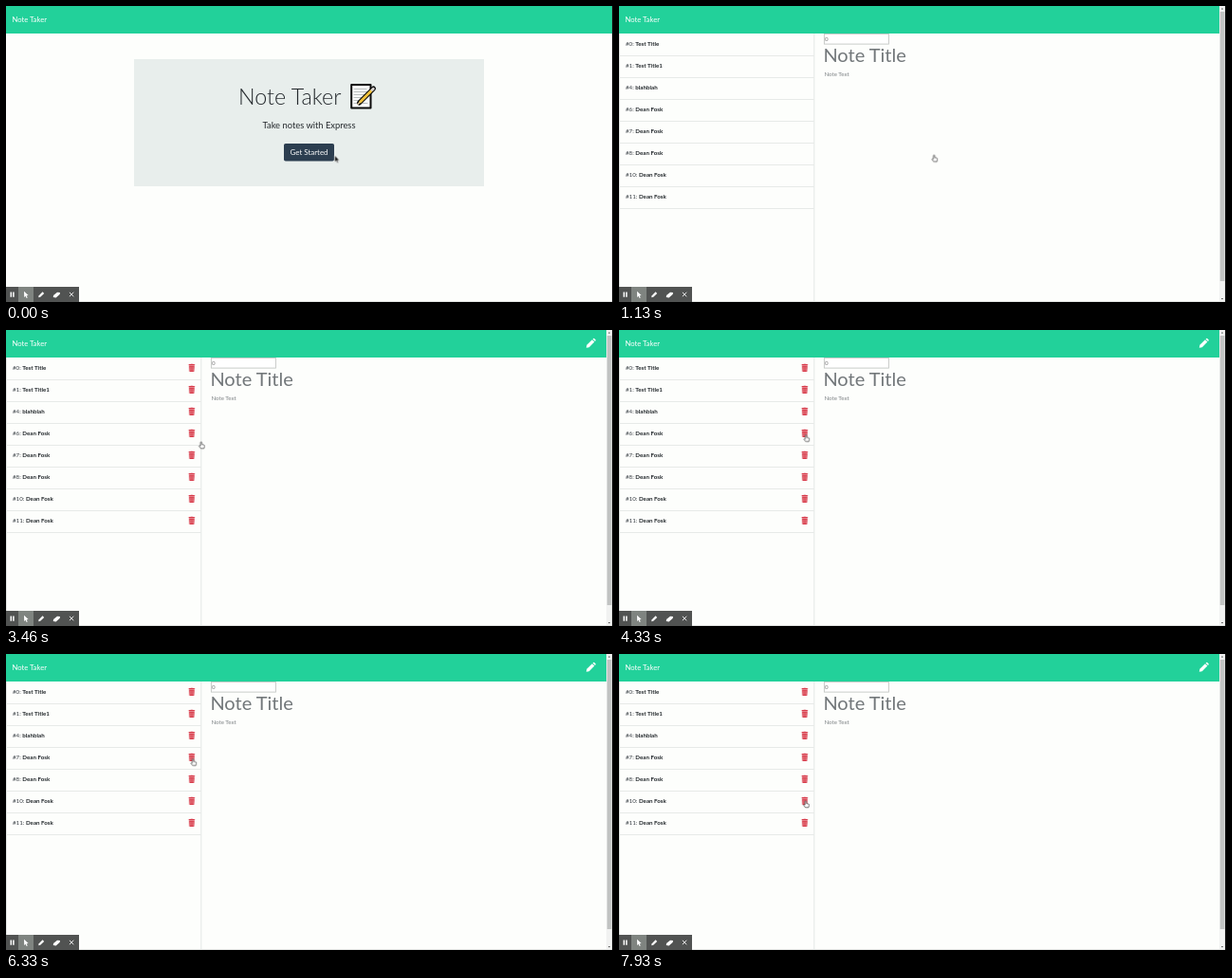
An HTML page that plays this animation: 640 by 312 pixels, repeating every 8000 ms.

```html
<!DOCTYPE html>
<html lang="en">
<head>
<meta charset="utf-8">
<title>Note Taker</title>
<style>
  html, body { margin: 0; width: 100%; height: 100%; overflow: hidden; background: #fdfefc; }
  svg { display: block; width: 640px; height: 312px; }
  text { font-family: Lato, sans-serif; }

  .step { animation: 8s step-end infinite; }
  #home { animation-name: leave; }
  #notes { animation-name: enter; }
  .icons { animation-name: icons; }
  #hover { animation-name: hover; }
  #focus { animation-name: focus; }
  #arrow { animation-name: arrow; }
  #hand { animation-name: hand; }
  #removed { animation-name: removed; }
  #tail { animation-name: shift; }
  #pointer { animation: travel 8s linear infinite; }
  #ring { animation: click 8s linear infinite; }

  @keyframes leave { 0% { opacity: 1 } 14%, 100% { opacity: 0 } }
  @keyframes enter { 0% { opacity: 0 } 14%, 100% { opacity: 1 } }
  @keyframes icons { 0% { opacity: 0 } 15.7%, 100% { opacity: 1 } }
  @keyframes hover { 0% { opacity: 0 } 1.6%, 100% { opacity: 1 } }
  @keyframes focus { 0% { opacity: 0 } 7.4%, 100% { opacity: 1 } }
  @keyframes arrow { 0% { opacity: 1 } 1.6%, 100% { opacity: 0 } }
  @keyframes hand { 0% { opacity: 0 } 1.6%, 100% { opacity: 1 } }
  @keyframes removed { 0% { opacity: 1 } 73.2%, 100% { opacity: 0 } }
  @keyframes shift { 0% { transform: none } 73.2%, 100% { transform: translateY(-23px) } }

  @keyframes travel {
    0%, .7% { transform: translate(346.6px, 157.5px) }
    2.5% { transform: translate(340px, 157.6px) }
    5%, 30.7% { transform: translate(332.2px, 157.3px) }
    35% { transform: translate(275px, 137px) }
    39.1%, 42.4% { transform: translate(222px, 122px) }
    43.2% { transform: translate(205.8px, 118.2px) }
    48.2%, 51.6% { transform: translate(199px, 112px) }
    54.1%, 91.6% { transform: translate(197.2px, 110.7px) }
    95% { transform: translate(197.4px, 132px) }
    99%, 100% { transform: translate(196.8px, 155px) }
  }
  @keyframes click {
    0%, 6.6% { opacity: 0; transform: scale(1) }
    6.65%, 8.2% { opacity: 1; transform: scale(1) }
    10%, 69% { opacity: 0; transform: scale(1) }
    69.05%, 70.8% { opacity: 1; transform: scale(1) }
    73%, 100% { opacity: 0; transform: scale(1) }
  }

  .row text { font-size: 6.2px; fill: #343a40; }
  .row tspan { font-weight: 700; fill: #22272b; }
  .row path { stroke: #e7eae8; }
</style>
</head>
<body>
<svg viewBox="0 0 640 312">
  <defs>
    <g id="trash">
      <path d="M-3.2-3.4H3.2M-1.2-3.8H1.2" stroke="#d83b4b" stroke-width="1.1"/>
      <path d="M-2.9-2.4H2.9L2.5 3.4Q2.4 4.1 1.8 4.1H-1.8Q-2.4 4.1-2.5 3.4Z" fill="#d83b4b"/>
      <path d="M-1.3-1.3V3M0-1.3V3M1.3-1.3V3" stroke="#eda0a7" stroke-width=".5"/>
    </g>
  </defs>

  <rect width="640" height="312" fill="#fdfefc"/>
  <rect width="640" height="29" fill="#22d19a"/>
  <text x="6.4" y="16.7" font-size="7.7" fill="#fff">Note Taker</text>

  <g id="home" class="step">
    <rect x="135" y="56" width="369" height="134" fill="#e8eeec"/>
    <text x="245" y="104" font-size="23.3" font-weight="300" fill="#24292d">Note Taker</text>
    <g stroke-linejoin="round" stroke-linecap="round">
      <path d="M364.2 83H384.5V107.6H364.2Z" fill="#fafafa" stroke="#0b0b0b" stroke-width="2"/>
      <path d="M367 87.5H380M367 90.5H381M367 93.5H378M367 96.5H375M367 99.5H372M367 102.5H370M376 102.5H381"
            stroke="#b4b8b8" stroke-width=".9"/>
      <path d="M387.5 87L372.5 102" stroke="#0b0b0b" stroke-width="5"/>
      <path d="M385 89.5L373.6 100.9" stroke="#f3c33c" stroke-width="2.8"/>
      <path d="M387.3 87.2L386 88.5" stroke="#d9d4d0" stroke-width="2.8"/>
      <path d="M371.2 103.3L372.8 101.7" stroke="#e9cfa0" stroke-width="1.4"/>
    </g>
    <text x="319.5" y="128.8" font-size="9.35" text-anchor="middle" fill="#24292d">Take notes with Express</text>
    <rect x="293" y="145" width="53" height="18.6" rx="1.8" fill="#2c3e50"/>
    <rect id="hover" class="step" x="293" y="145" width="53" height="18.6" rx="1.8" fill="#1e2b37"/>
    <rect id="focus" class="step" x="292.5" y="144.5" width="54" height="19.6" rx="2.2"
          fill="#1a252f" stroke="#8fa0a8" stroke-width="1.4"/>
    <text x="319.5" y="156.7" font-size="7.95" text-anchor="middle" fill="#fff">Get Started</text>
  </g>

  <g id="notes" class="step">
    <path d="M.5 29V312M205.8 29V312" stroke="#e4e7e5"/>
    <g id="list"></g>
    <g id="removed" class="step"></g>
    <g id="tail" class="step"></g>

    <rect x="216.4" y="29.5" width="68" height="10.6" fill="#fff" stroke="#c3c6c4" stroke-width=".9"/>
    <text x="217" y="37" font-size="6.2" fill="#777">0</text>
    <text x="215.4" y="59.3" font-size="20" fill="#72777a">Note Title</text>
    <text x="216.4" y="73.6" font-size="6.2" fill="#7d8285">Note Text</text>

    <g class="step icons" fill="#fff">
      <path d="M611.8 18.8L612.4 15.8L618 10.2L620.4 12.6L614.8 18.2Z"/>
      <path d="M618.6 9.6L619.3 8.9Q619.9 8.5 620.4 9L621.6 10.2Q622.1 10.7 621.6 11.3L621 12Z"/>
    </g>

    <rect x="633" width="6" height="312" fill="#f1f2f1"/>
    <rect x="633.8" y="6" width="4.6" height="284" fill="#c1c3c2"/>
    <path d="M634.8 3.6L636 2L637.2 3.6ZM634.8 308L636 309.6L637.2 308Z" fill="#555"/>
  </g>

  <path d="M77 311.5H639" stroke="#e3e5e3"/>
  <path d="M639.5 0V312" stroke="#1c1c1c"/>

  <g id="toolbar">
    <rect y="296" width="77" height="16" fill="#515352"/>
    <rect x="13" y="296" width="16" height="16" fill="#7f8480"/>
    <path d="M5.3 301.5V306.7M7.9 301.5V306.7" stroke="#fff" stroke-width="1.5"/>
    <path d="M19 300.8L23.6 305L21.7 305.3L22.7 307.4L21.6 307.9L20.7 305.8L19.2 307.1Z" fill="#fff"/>
    <path d="M34.2 307.2L34.7 305.2L38.6 301.3L40.2 302.9L36.2 306.8Z" fill="#fff"/>
    <path d="M50 305L54 301.8L57 302L56.6 304L52.6 307.4L49.8 307Z" fill="#fff"/>
    <path d="M66.9 301.8L71.3 306.2M71.3 301.8L66.9 306.2" stroke="#fff" stroke-width=".9"/>
  </g>

  <g id="pointer">
    <circle id="ring" r="10.5" fill="#d8425c" fill-opacity=".05" stroke="#d5475f" stroke-width="1.5"/>
    <path id="arrow" class="step" d="M0 0V7L1.6 5.6L2.7 8.1L3.8 7.6L2.7 5.2H4.8Z"
          fill="#111" stroke="#fff" stroke-width=".5"/>
    <path id="hand" class="step"
          d="M-.8.3Q0-.7.8.3V2.6L3 3.1Q3.8 3.4 3.6 4.3L3 6.8H-.4L-2.2 4.3Q-2 3.3-.8 4.2Z"
          fill="#fff" stroke="#3a3a3a" stroke-width=".7" stroke-linejoin="round"/>
  </g>
</svg>
<script>
  const person = "Dean Fosk";
  const notes = [
    [0, "Test Title"], [1, "Test Title1"], [4, "blahblah"], [6, person],
    [7, person], [8, person], [10, person], [11, person]
  ];
  const row = ([id, title], i) => `
    <g class="row" transform="translate(0 ${29 + i * 23})">
      <text x="7" y="13.2">#${id}: <tspan>${title}</tspan></text>
      <use class="step icons" href="#trash" x="195.8" y="11"/>
      <path d="M0 23.5H205.8"/>
    </g>`;
  const rows = notes.map(row);
  const fill = (id, part) => { document.getElementById(id).innerHTML = part.join(""); };
  fill("list", rows.slice(0, 3));
  fill("removed", rows.slice(3, 4));
  fill("tail", rows.slice(4));
</script>
</body>
</html>
```
